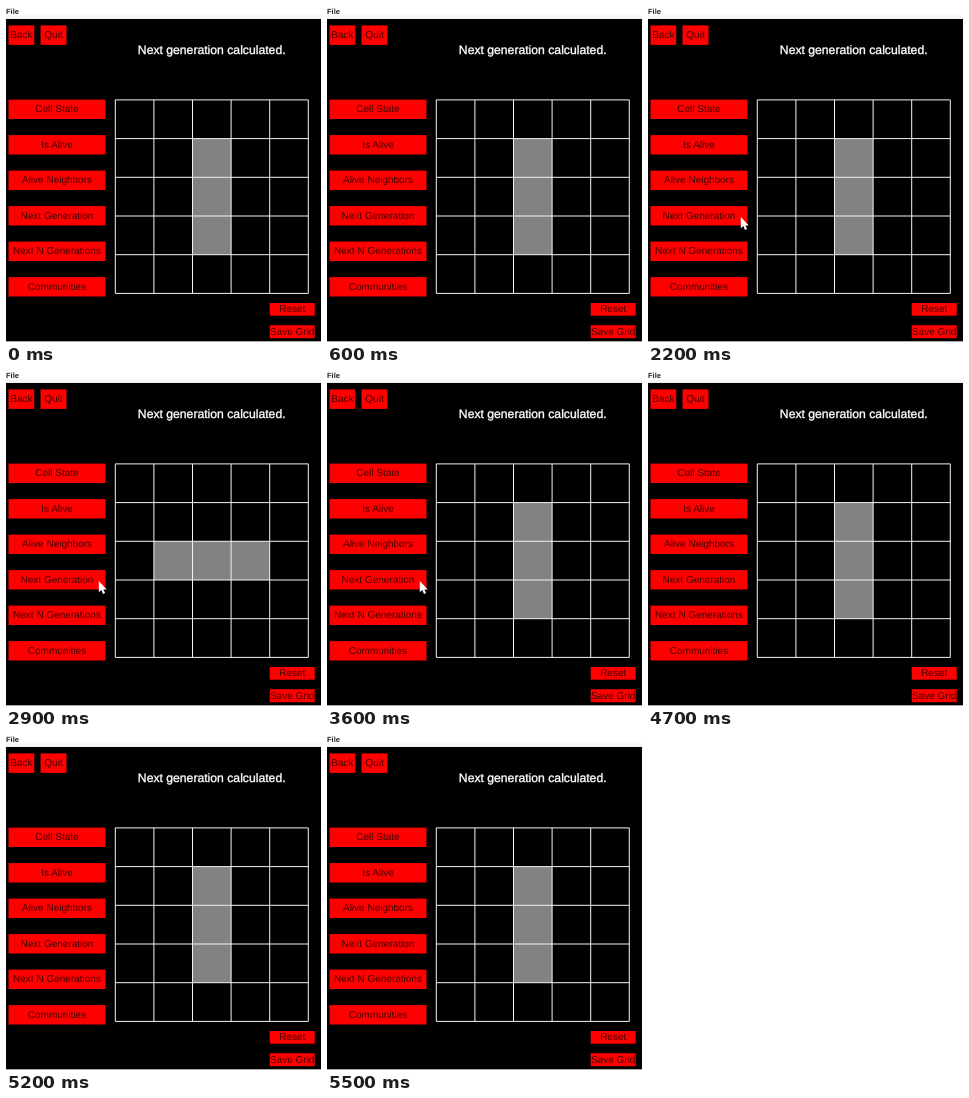
An HTML page that plays this animation: 315x336 px, repeating every 5600 ms.

```html
<!DOCTYPE html>
<html lang="en">
<head>
<meta charset="utf-8">
<title>Game of Life</title>
<style>
  html, body { margin: 0; width: 100%; height: 100%; overflow: hidden; background: #000; }
  svg { display: block; width: 100vw; height: 100vh; }
  text { font-family: "Liberation Sans", Arial, sans-serif; text-rendering: geometricPrecision; }
  .label { font-size: 10px; text-anchor: middle; fill: #400; }
</style>
</head>
<body>
<svg id="stage" viewBox="0 0 315 336">
  <defs>
    <linearGradient id="bar" x2="0" y2="1">
      <stop offset=".6" stop-color="#fff"/>
      <stop offset="1" stop-color="#eee"/>
    </linearGradient>
  </defs>
  <rect width="315" height="336" fill="#000"/>
  <rect width="315" height="13" fill="url(#bar)"/>
  <rect y="335" width="315" height="1" fill="#aaa"/>
  <text x="0" y="7.6" font-size="7.5" font-weight="bold" fill="#222">File</text>
  <text x="205.7" y="48" font-size="12.2" text-anchor="middle" fill="#fff" stroke="#fff" stroke-width=".35">Next generation calculated.</text>
  <g id="buttons"></g>
  <g id="cells" fill="#838183"></g>
  <path id="grid" fill="none" stroke="#f4f4f4"/>
  <path id="cursor" d="M92.800 211V222.300l2.500-2.200 1.700 3.900 2.100-.9-1.700-3.700h3.300z" fill="#fff"/>
</svg>
<script>
const LOOP = 5600;
const TOGGLES = [1400, 2200, 2900, 3600];
const POINTER = { from: 1400, to: 3800 };
const N = 5;

const el = id => document.getElementById(id);

function add(parent, tag, attrs, text) {
  const node = document.createElementNS("http://www.w3.org/2000/svg", tag);
  for (const key in attrs) node.setAttribute(key, attrs[key]);
  if (text) node.textContent = text;
  parent.appendChild(node);
  return node;
}

function button(text, x, y, w, h, base) {
  add(el("buttons"), "rect", { x, y, width: w, height: h, fill: "#fe0000" });
  add(el("buttons"), "text", { x: x + w / 2, y: y + base, class: "label" }, text);
}

button("Back", 2.5, 19.4, 25.7, 19.5, 12.6);
button("Quit", 34.5, 19.4, 26, 19.5, 12.6);
["Cell State", "Is Alive", "Alive Neighbors", "Next Generation",
 "Next N Generations", "Communities"].forEach((text, i) =>
  button(text, 2.5, 93.6 + 35.5 * i, 97, 19.4, 12.5));
button("Reset", 263.7, 297, 45, 12.7, 9);
button("Save Grid", 263.7, 319.2, 45, 13, 9.8);

const lineX = i => 109.3 + 38.6 * i;
const lineY = i => 93.9 + 38.7 * i;

let path = "";
for (let i = 0; i <= N; i++) {
  path += `M${lineX(i)} ${lineY(0)}V${lineY(N)}M${lineX(0)} ${lineY(i)}H${lineX(N)}`;
}
el("grid").setAttribute("d", path);

function cell(col, row) {
  const x = lineX(col), y = lineY(row);
  return add(el("cells"), "rect", {
    x, y, width: lineX(col + 1) - x, height: lineY(row + 1) - y
  });
}

cell(2, 2);
const column = [cell(2, 1), cell(2, 3)];
const row = [cell(1, 2), cell(3, 2)];
const show = (node, on) => node.setAttribute("visibility", on ? "visible" : "hidden");

function draw(t) {
  const flat = TOGGLES.filter(at => t >= at).length % 2 === 1;
  column.forEach(node => show(node, !flat));
  row.forEach(node => show(node, flat));
  show(el("cursor"), t >= POINTER.from && t < POINTER.to);
}

let start;
function tick(now) {
  start ??= now;
  draw((now - start) % LOOP);
  requestAnimationFrame(tick);
}
draw(0);
requestAnimationFrame(tick);
</script>
</body>
</html>
```
